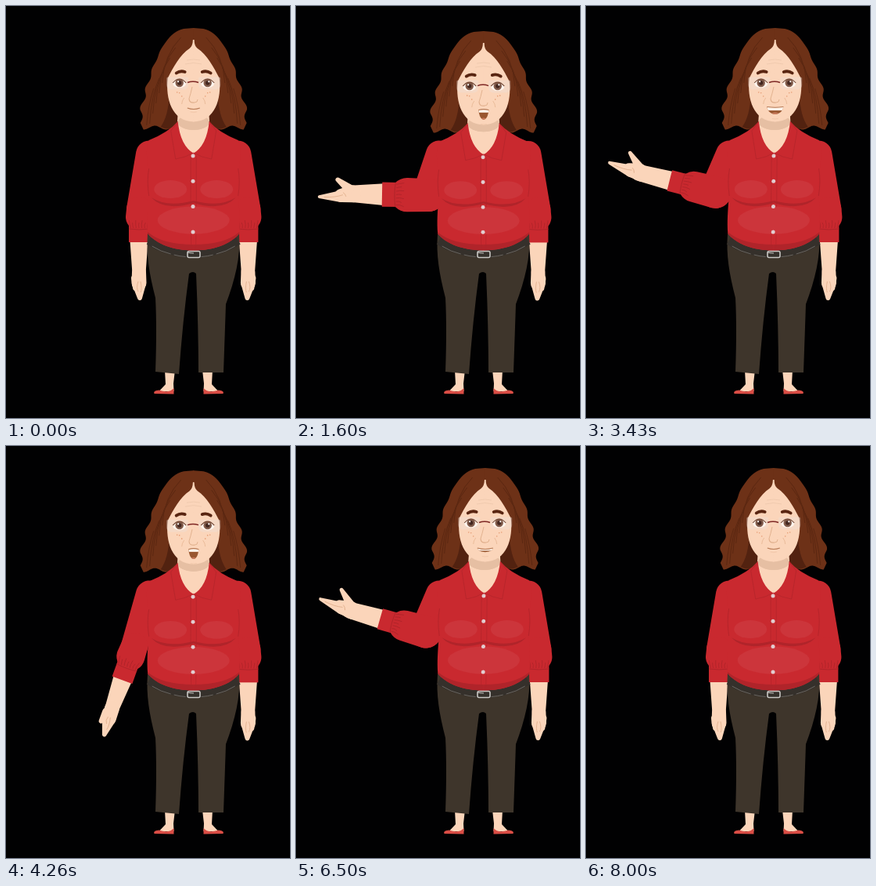
Write an HTML page with a canvas that moves like this. It is 363x525 px and loops after 8030 ms.

```html
<!DOCTYPE html>
<html lang="en">
<head>
<meta charset="utf-8">
<title>Presenter</title>
<style>
html, body { margin: 0; width: 100%; height: 100%; overflow: hidden; background: #010102; }
canvas { display: block; }
</style>
</head>
<body>
<canvas id="stage" width="363" height="525"></canvas>
<script>
const ctx = document.getElementById('stage').getContext('2d');
const LOOP = 8030, GESTURE = 4000, AXIS = 239.7;
const SKIN = '#fbd5ba', SKIN_SHADE = '#e6bfa3', SKIN_LINE = '#dfae8b';
const RED = '#c9292f', RED_SHADE = '#b0242a', RED_LIGHT = '#cc353b';
const HAIR = '#6d3117', HAIR_DARK = '#522210', STRAND = '#5b2711';
const PANTS = '#3e352b', BELT = '#35302b', STITCH = '#77736e', METAL = '#c9c7c4';

// Elbow x, y, radius; forearm angle; sleeve length; cuff and puff half widths; hand opening; wrist bend
const REST = [170, 259, 16, 90, 42, 13, 17, 0, 0];
const LEVEL = [170, 242, 21, 178, 59, 16, 22, 1, 0];
const RAISED = [166, 237, 20.5, 196, 61, 13.5, 19.5, 1, .2];

// Width, height and lip sag
const MOUTHS = {
  smile: [8, 0, 3], flat: [10, 0, .6], small: [10, 5.5, 3], round: [6.5, 13, -2], grin: [10.5, 10, 1.5]
};
const SYLLABLES = ['flat', 'round', 'small', 'round', 'grin'];
const SYLLABLE_MS = 140;

const lerp = (a, b, u) => a + (b - a) * u;
const mix = (p, q, u) => p.map((v, i) => lerp(v, q[i], u));
const part = (t, from, to) => Math.min(1, Math.max(0, (t - from) / (to - from)));
const ramp = (t, from, to) => { const u = part(t, from, to); return u * u * (3 - 2 * u); };
const bump = (t, from, to) => Math.sin(Math.PI * part(t, from, to)) ** 2;

function poseAt(t) {
  const lift = ramp(t, 30, 780);
  const raise = ramp(t, 1460, 2000) + .15 * bump(t, 3060, 3430);
  const drop = ramp(t, 3400, 3810);
  const pose = mix(mix(mix(REST, LEVEL, lift), RAISED, raise), REST, drop);
  pose[0] -= 9 * Math.sin(Math.PI * lift * (1 - drop));
  return pose;
}

function headAt(t) {
  return {
    lean: 2 * (ramp(t, 1560, 2060) - ramp(t, 3430, 3800)),
    dip: 3.3 * bump(t, 30, 560) + 4.4 * bump(t, 1460, 1800) + 4 * bump(t, 3430, 3900)
  };
}

function mouthAt(t) {
  if (t < 60 || t > 3880) return 'smile';
  const silent = (t > 1100 && t < 1500) || (t > 2640 && t < 2860);
  return silent ? 'flat' : SYLLABLES[Math.floor(t / SYLLABLE_MS) % SYLLABLES.length];
}

// Draws both halves; x runs outward from the body axis
function mirror(half, axis = AXIS) {
  for (const side of [-1, 1]) {
    ctx.save();
    ctx.translate(axis, 0);
    ctx.scale(side, 1);
    half();
    ctx.restore();
  }
}

function shape(fill, trace) {
  ctx.beginPath();
  trace();
  ctx.closePath();
  ctx.fillStyle = fill;
  ctx.fill();
}

const poly = (fill, ...pts) => shape(fill, () => pts.forEach(p => ctx.lineTo(...p)));
const ellipse = (x, y, rx, ry, fill) => shape(fill, () => ctx.ellipse(x, y, rx, ry, 0, 0, 7));

function curve(x1, y1, cx, cy, x2, y2, color, width = 1) {
  ctx.beginPath();
  ctx.moveTo(x1, y1);
  ctx.quadraticCurveTo(cx, cy, x2, y2);
  ctx.strokeStyle = color;
  ctx.lineWidth = width;
  ctx.stroke();
}

function capsule(x1, y1, r1, x2, y2, r2, fill) {
  const d = Math.hypot(x2 - x1, y2 - y1) || 1, a = Math.atan2(y2 - y1, x2 - x1);
  const b = Math.acos(Math.max(-1, Math.min(1, (r1 - r2) / d)));
  shape(fill, () => {
    ctx.arc(x1, y1, r1, a + b, a - b + 2 * Math.PI);
    ctx.arc(x2, y2, r2, a - b, a + b);
  });
}

function hand(cuff, open, bend) {
  const at = (rest, spread) => lerp(rest, spread, open);
  capsule(-8, 0, cuff * .92, 40, 0, at(8.5, 10.5), SKIN);
  ctx.transform(1, bend, 0, 1, 0, -35 * bend);
  capsule(38, 0, at(9, 11), 52, at(0, -3), at(9.5, 8.5), SKIN);
  capsule(52, at(0, -4), at(9, 7.5), at(71, 80), at(-1, -6), at(3, 2), SKIN);
  capsule(at(46, 42), at(4, 6), 6, at(59, 57), at(5, 17), 2.8, SKIN);
  curve(50, -2, 60, at(-4, -6), at(64, 74), at(-2, -6), SKIN_LINE, .8);
  curve(50, 1, at(58, 47), at(4, 0), at(63, 46), at(1, -4), SKIN_LINE, .8);
}

function arm([ex, ey, er, deg, length, cuff, puff, open, bend]) {
  const a = deg * Math.PI / 180;
  const along = d => [ex + d * Math.cos(a), ey + d * Math.sin(a)];
  const atCuff = draw => {
    ctx.save();
    ctx.translate(...along(length));
    ctx.rotate(a);
    draw();
    ctx.restore();
  };
  atCuff(() => hand(cuff, open, bend));
  capsule(183, 188.5, 17, ex, ey, er, RED);
  capsule(ex, ey, er, ...along(length - 32), puff, RED);
  atCuff(() => {
    ctx.fillStyle = RED;
    ctx.fillRect(-24, -cuff, 24, 2 * cuff);
    curve(-17, -cuff, -15, 0, -17, cuff, RED_SHADE);
    for (let i = -3; i <= 3; i++) {
      const y = i * cuff * .28;
      curve(-18, y, -22, y + 1, -25 - (i & 1) * 3, y * 1.15, RED_SHADE, .9);
    }
  });
}

function legs() {
  mirror(() => {
    poly(SKIN, [17.5, 464], [30.5, 464], [29.5, 482], [38, 491], [19, 491], [19.5, 481]);
    shape('#d94d45', () => {
      ctx.moveTo(19, 487);
      ctx.quadraticCurveTo(25, 494, 38, 489.5);
      ctx.quadraticCurveTo(46, 490, 44, 494);
      ctx.lineTo(19, 494.5);
    });
  }, 233.5);
  shape(PANTS, () => {
    ctx.moveTo(181, 290);
    ctx.bezierCurveTo(179, 318, 183, 340, 191, 372);
    ctx.quadraticCurveTo(193, 410, 191, 466);
    ctx.lineTo(221, 469);
    ctx.quadraticCurveTo(226, 400, 234, 341);
    ctx.quadraticCurveTo(239, 337, 243, 341);
    ctx.quadraticCurveTo(246, 410, 246, 467);
    ctx.lineTo(278, 467);
    ctx.quadraticCurveTo(280, 410, 281, 380);
    ctx.bezierCurveTo(293, 348, 300, 320, 298, 290);
  });
  mirror(() => {
    curve(0, 316, 34, 314, 57, 299, BELT, 11);
    curve(10, 319.5, 18, 319, 25, 317, STITCH, .8);
    curve(29, 316, 42, 313, 53, 306, STITCH, .8);
  });
}

function buckle() {
  ctx.strokeStyle = METAL;
  ctx.lineWidth = 1.6;
  ctx.beginPath();
  ctx.roundRect(232, 312.5, 16, 8, 2);
  ctx.stroke();
  curve(232, 314, 236, 315, 240, 315, METAL, 1.2);
}

function torso() {
  poly(SKIN, [220, 130], [259, 130], [261, 165], [239.5, 192], [218, 165]);
  mirror(() => {
    ellipse(0, 148, 20, 10, SKIN_SHADE);
    shape(RED, () => {
      ctx.moveTo(-.5, 188);
      ctx.quadraticCurveTo(17, 178, 20, 147);
      ctx.quadraticCurveTo(32, 161, 57, 171);
      ctx.quadraticCurveTo(62, 180, 58, 210);
      ctx.bezierCurveTo(54, 230, 61, 260, 58.5, 290);
      ctx.bezierCurveTo(48, 303, 26, 311.5, -.5, 311.5);
    });
    shape(RED_SHADE, () => {
      ctx.moveTo(58.5, 288);
      ctx.quadraticCurveTo(40, 304, -.5, 304);
      ctx.lineTo(-.5, 311.5);
      ctx.bezierCurveTo(26, 311.5, 48, 303, 58.5, 290);
    });
    ellipse(29.5, 233.5, 21, 11.5, RED_LIGHT);
    shape(RED_SHADE, () => {
      ctx.moveTo(54, 244);
      ctx.quadraticCurveTo(34, 257, -.5, 248);
      ctx.lineTo(-.5, 251);
      ctx.quadraticCurveTo(38, 262, 54, 244);
    });
    curve(57, 207, 60, 223, 57, 242, RED_SHADE, .8);
    curve(3.5, 191, 4, 250, 3, 309, RED_SHADE, .7);
    // Collar flap
    ctx.beginPath();
    ctx.moveTo(20, 147);
    ctx.lineTo(29, 159);
    ctx.lineTo(23, 195);
    ctx.quadraticCurveTo(10, 193, 0, 187);
    ctx.stroke();
  });
  ellipse(AXIS, 273, 46, 17.5, RED_LIGHT);
  for (let i = 0; i < 4; i++) ellipse(239, 191 + i * 32.3, 2.5, 2.5, '#e2cdd0');
}

function hair() {
  const halfWidth = y => Math.min(67, 66 * ((y - 28) / 100) ** .36) + 2 * Math.sin(y / 3.9) * part(y, 40, 110);
  mirror(() => {
    shape(HAIR, () => {
      ctx.moveTo(-.5, 28);
      for (let y = 28; y <= 149; y++) ctx.lineTo(halfWidth(y), y);
      for (let x = 64; x >= 0; x--) ctx.lineTo(x, 155 + 2.5 * Math.sin(x / 4.5));
      ctx.lineTo(-.5, 150);
    });
    shape(HAIR_DARK, () => {
      ctx.moveTo(31, 112);
      ctx.quadraticCurveTo(32, 140, 42, 154);
      ctx.quadraticCurveTo(28, 161, 18, 150);
      ctx.lineTo(16, 134);
    });
    for (let i = 0; i < 6; i++) {
      const x = 16 + i * 7, y = 40 + i * 13;
      curve(x, y, x + 22 - i * 3, y + 22, x + 24 - i * 3, Math.min(152, y + 58), STRAND);
    }
  });
}

function eye(x, lid) {
  ellipse(x, 98.5, 8.5, 5.5, '#fff5ee');
  ellipse(x, 98, 5.2, 5.2, '#7f5a4a');
  ellipse(x, 98, 2.6, 2.7, '#432720');
  ellipse(x + 1.6, 96.3, 1.1, 1.1, '#fff');
  if (lid > 0) {
    ctx.save();
    ctx.beginPath();
    ctx.rect(x - 10, 91, 20, 14 * lid);
    ctx.clip();
    ellipse(x, 98.5, 9, 6.4, '#f3c9ac');
    ctx.restore();
  }
  curve(x - 8.5, 98, x, lerp(88, 108, lid), x + 8.5, 98, '#70432f', 1.1);
}

function mouth([w, h, sag]) {
  const x = 239.8, y = h > 8 ? 128.5 : 130;
  if (h) {
    ctx.save();
    shape('#995730', () => {
      ctx.moveTo(x - w, y);
      ctx.quadraticCurveTo(x, y + sag, x + w, y);
      ctx.bezierCurveTo(x + w * .8, y + h * 1.25, x - w * .8, y + h * 1.25, x - w, y);
    });
    ctx.clip();
    ctx.fillStyle = '#fff4ea';
    ctx.fillRect(x - w, y - 3, 2 * w, 3 + Math.min(4, h * .4) + sag * .4);
    if (h > 8) ellipse(x, y + h, w * .5, 3, '#c8795a');
    ctx.restore();
  }
  curve(x - w, y, x, y + sag, x + w, y, '#b77a55', 1.1);
  curve(x - 4, y + h + 5, x, y + h + 6, x + 4, y + h + 5, '#efc4a6', .8);
}

function face(t) {
  const lid = Math.max(bump(t, 900, 1080), bump(t, 2870, 3050));
  mirror(() => {
    shape(SKIN, () => {
      ctx.moveTo(-.5, 43);
      ctx.lineTo(.8, 43);
      ctx.quadraticCurveTo(1, 51, 5, 54);
      ctx.bezierCurveTo(17, 62, 26, 78, 33, 92);
      ctx.bezierCurveTo(36, 118, 28, 147, -.5, 147.5);
    });
    ctx.fillStyle = 'rgba(235,225,220,.36)';
    ctx.beginPath();
    ctx.roundRect(6.5, 90.5, 28, 16, [2, 2, 6, 6]);
    ctx.fill();
    eye(18, lid);
    ctx.lineCap = 'round';
    curve(11, 84 - 2 * lid, 17, 82 - 2 * lid, 22, 85.5 - 2 * lid, '#592511', 3.8);
    ctx.lineCap = 'butt';
    curve(12, 117, 15, 121, 15, 125, '#e8b997', .9);
    for (let i = 0; i < 3; i++) ellipse(15 + 3 * i, 112 + 3 * Math.cos(2 * i), .8, .8, '#e59d74');
  });
  for (let i = 0; i < 2; i++) curve(229 + i * 2, 74 - i * 5, 240, 71 - i * 4, 250 - i * 2, 74 - i * 5, '#efc9ad', .9);
  curve(232, 97.5, 239, 95, 246, 97.5, '#7d2724', 1.5);
  curve(238, 103, 236, 112, 234, 118, SKIN_LINE, .9);
  curve(234, 118, 234, 124, 241, 123, SKIN_LINE, 1.1);
  curve(241, 123, 245, 123, 245, 119, SKIN_LINE, .9);
  mouth(MOUTHS[mouthAt(t)]);
}

function layer(transform, paint) {
  ctx.save();
  transform();
  paint();
  ctx.restore();
}

function draw(now) {
  const time = now % LOOP;
  const t = time < GESTURE ? time : Math.min(time - GESTURE, GESTURE);
  const { lean, dip } = headAt(t);
  const moveHead = () => ctx.translate(lean, dip);
  ctx.fillStyle = '#010102';
  ctx.fillRect(0, 0, 363, 525);

  layer(moveHead, hair);
  arm(poseAt(t));
  layer(() => {
    ctx.translate(2 * AXIS + lean * .5, dip * .1);
    ctx.scale(-1, 1);
  }, () => arm(REST));
  legs();
  // The chest leans and sinks from the waist up
  layer(() => ctx.transform(1, 0, -lean * .004, 1 - dip * .0035, lean * 1.24, dip * 1.085), torso);
  buckle();
  layer(moveHead, () => face(t));
}

const start = performance.now();
function tick() {
  draw(performance.now() - start);
  requestAnimationFrame(tick);
}
tick();
</script>
</body>
</html>
```
